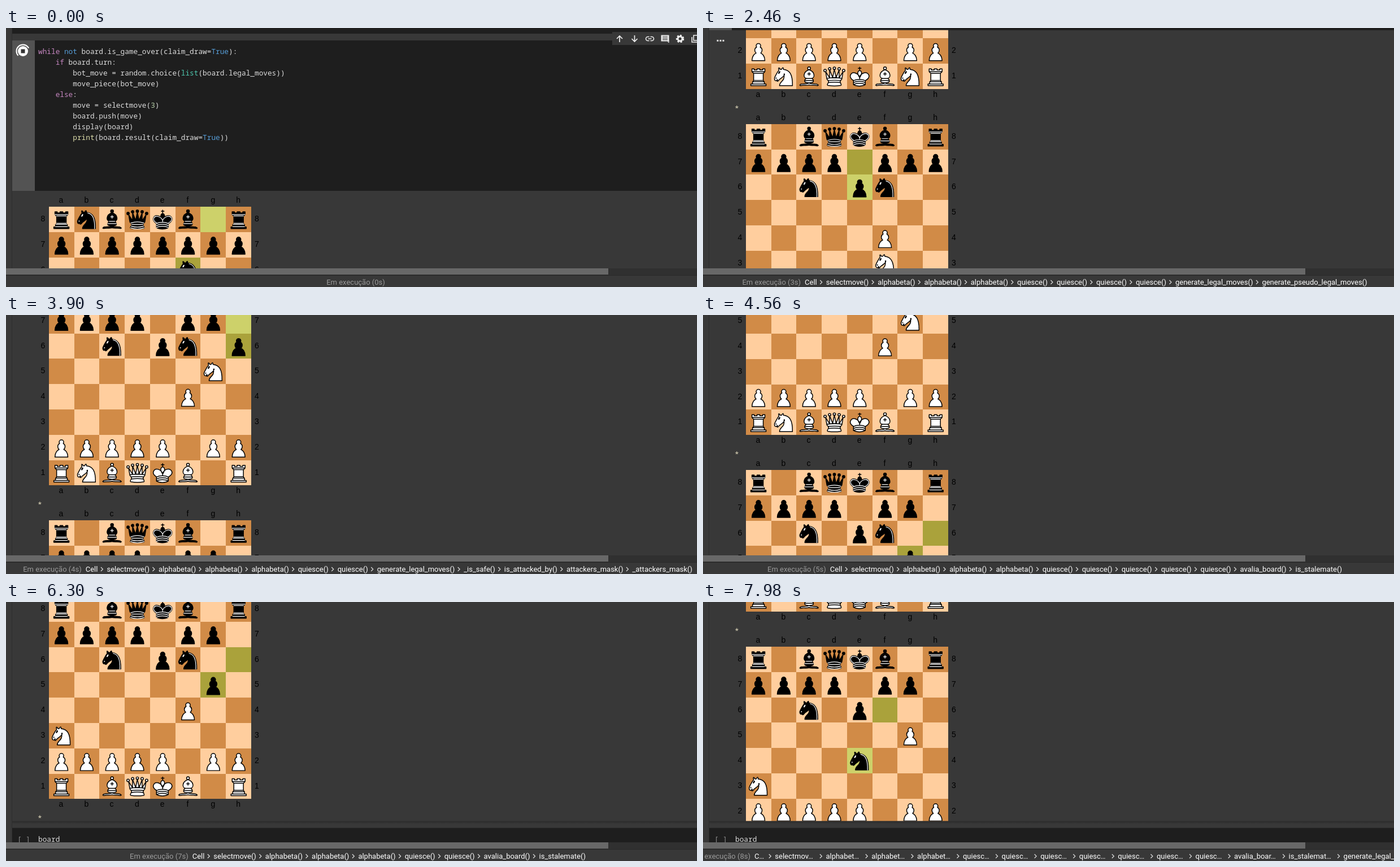
These frames come from a looping animation (1223 by 458 pixels, 8 s). An HTML page with a canvas:

```html
<!DOCTYPE html>
<html lang="pt">
<head>
<meta charset="utf-8">
<style>
html, body { margin: 0; width: 1223px; height: 458px; overflow: hidden; background: #383838; }
canvas { display: block; }
</style>
</head>
<body>
<canvas id="stage" width="1223" height="458"></canvas>
<script>
const ctx = document.getElementById('stage').getContext('2d');
const LOOP = 8000, STEP = 60, SQ = 44.8, PITCH = 420.2, OUT_H = 563.5;
const MONO = '12.77px "Noto Sans Mono", "DejaVu Sans Mono", monospace';
const UI = '13px Roboto, sans-serif';
const LABEL = '14px "Liberation Sans", Arial, sans-serif';

// ---- pieces, on a 45 unit square: body, lines for white, lines for black
const lowBand = 'M11.5 30c5.5-3 15.5-3 21 0M11.5 33.5c5.5-3 15.5-3 21 0M11.5 37c5.5-3 15.5-3 21 0';
const rookLines = 'M12 35.5h21M13 31.5h19M14 29.5h17M14 16.5h17M11 14h23';
const bishopLines = 'M17.5 26h10M15 30h15m-7.5-14.5v5M20 18h5';
const eyes = 'M9.4 25.5a.4.4 0 1 1-.8 0 .4.4 0 1 1 .8 0zM14.9 15.7a.5 1.5 30 1 1-.8-.5.5 1.5 30 1 1 .8.5z';
const dots = [[6, 12], [14, 9], [22.5, 8], [31, 9], [39, 12]]
  .map(([x, y]) => `M${x + 2.2} ${y}a2.2 2.2 0 1 1-4.4 0 2.2 2.2 0 1 1 4.4 0z`).join('');
const shapes = {
  p: ['M22.5 9c-2.21 0-4 1.79-4 4 0 .89.29 1.71.78 2.38C17.33 16.5 16 18.59 16 21c0 2.03.94 3.84 2.41 5.03-3 1.06-7.41 5.55-7.41 13.47h23c0-7.92-4.41-12.41-7.41-13.47 1.47-1.19 2.41-3 2.41-5.03 0-2.41-1.33-4.5-3.28-5.62.49-.67.78-1.49.78-2.38 0-2.21-1.79-4-4-4z', '', ''],
  n: ['M22 10c10.5 1 16.5 8 16 29H15c0-9 10-6.5 8-21M24 18c.38 2.91-5.55 7.37-8 9-3 2-2.82 4.34-5 4-1.04-.94 1.41-3.04 0-3-1 0 .19 1.23-1 2-1 0-4 1-4-4 0-2 6-12 6-12s1.89-1.9 2-3.5c-.73-1-.5-2-.5-3 1-1 3 2.5 3 2.5h2s.78-2 2.5-3c1 0 1 3 1 3',
    eyes, eyes + 'M24.4 11.2c7 1.2 12.8 8 12 28'],
  b: ['M9 36c3.39-.97 10.11.43 13.5-2 3.39 2.43 10.11 1.03 13.5 2 0 0 1.65.54 3 2-.68.97-1.65.99-3 .5-3.39-.97-10.11.46-13.5-1-3.39 1.46-10.11.03-13.5 1-1.35.49-2.32.47-3-.5 1.35-1.94 3-2 3-2zM15 32c2.5 2.5 12.5 2.5 15 0 .5-1.5 0-2 0-2 0-2.5-2.5-4-2.5-4 5.5-1.5 6-11.5-5-15.5-11 4-10.5 14-5 15.5 0 0-2.5 1.5-2.5 4 0 0-.5.5 0 2zM25 8a2.5 2.5 0 1 1-5 0 2.5 2.5 0 1 1 5 0z',
    bishopLines, bishopLines],
  r: ['M9 39h27v-3H9zM12 36v-4h21v4zM12.5 32l1.5-2.5h17l1.5 2.5zM14 29.5V17h17v12.5zM14 17l-3-3h23l-3 3zM11 14V9h4v2h5V9h5v2h5V9h4v5z', '', rookLines],
  q: [dots + 'M9 26c8.5-1.5 21-1.5 27 0l2-12-7 11V11l-5.5 13.5-3-15-3 15-5.5-14V25L7 14l2 12zM9 26c0 2 1.5 2 2.5 4 1 1.5 1 1 .5 3.5-1.5 1-1.5 2.5-1.5 2.5-1.5 1.5.5 2.5.5 2.5 6.5 1 16.5 1 23 0 0 0 1.5-1 0-2.5 0 0 .5-1.5-1-2.5-.5-2.5-.5-2 .5-3.5 1-2 2.5-2 2.5-4-8.5-1.5-18.5-1.5-27 0z',
    'M11.5 30c3.5-1 18.5-1 22 0M12 33.5c6-1 15-1 21 0',
    'M11 29a35 35 0 0 1 23 0M12.5 31.5h20M11.5 34.5a35 35 0 0 0 22 0M10.5 37.5a35 35 0 0 0 24 0'],
  k: ['M22.5 11.63V6M20 8h5M22.5 25s4.5-7.5 3-10.5c0 0-1-2.5-3-2.5s-3 2.5-3 2.5c-1.5 3 3 10.5 3 10.5M11.5 37c5.5 3.5 15.5 3.5 21 0v-7s9-4.5 6-10.5c-4-6.5-13.5-3.5-16 4V27v-3.5c-3.5-7.5-13-10.5-16-4-3 6 5 10 5 10V37z',
    lowBand, lowBand + 'M32 29.5s8.5-4 6-9.65C34.15 14 25 18 22.5 24.5v2.1-2.1C20 18 9.9 14 7 19.85c-2.5 5.65 4.85 9 4.85 9']
};
for (const key in shapes) shapes[key] = shapes[key].map(d => new Path2D(d));

// ---- the game: one board after each pair of moves
const square = s => [8 - s[1], s.charCodeAt(0) - 97];
const grid = ['rnbqkbnr', 'pppppppp', '', '', '', '', 'PPPPPPPP', 'RNBQKBNR']
  .map(row => [...row.padEnd(8)]);
const boards = ['f2f3 g8f6', 'f3f4 b8c6', 'g1f3 e7e6', 'f3g5 h7h6', 'b1a3 h6g5', 'f4g5 f6e4'].map(pair => {
  let marks;
  for (const move of pair.split(' ')) {
    const [r, c] = square(move), [r2, c2] = square(move.slice(2));
    grid[r2][c2] = grid[r][c];
    grid[r][c] = ' ';
    marks = [r * 8 + c, r2 * 8 + c2];
  }
  return { rows: grid.map(row => row.join('')), marks };
});

// ---- scrolling: start, end, distance
const pageMoves = [[850, 1080, 106], [1930, 2160, 100], [2290, 2520, 94], [2470, 2640, 76], [5590, 5820, 88]];
const outputMoves = [[1150, 1320, 282.2], [2290, 2455, 420.2], [2780, 2940, 420.2], [3070, 3300, 122.6],
  [3850, 4080, 101.6], [4570, 4800, 98], [4930, 5160, 98], [6490, 6720, -99], [6850, 7015, 518.2], [7750, 7980, -88]];
const ease = x => x * x * (3 - 2 * x);
const scrollAt = (moves, t) => moves.reduce((sum, [a, b, d]) =>
  sum + d * ease(Math.min(1, Math.max(0, (t - a) / (b - a)))), 0);

// ---- call stack shown in the status bar, one letter per function
const calls = {
  C: 'Cell', s: 'selectmove()', a: 'alphabeta()', q: 'quiesce()', g: 'generate_legal_moves()',
  p: 'generate_pseudo_legal_moves()', v: 'avalia_board()', t: 'is_stalemate()', f: '_is_safe()',
  i: 'is_attacked_by()', m: 'attackers_mask()', n: '_attackers_mask()', b: '_slider_blockers()', l: '__len__()'
};
const stacks = `0 |120 Csaaaqvtg|240 Csaaaqqvt|360 Csaaaqqqqvt|480 Csaaaqgp|600 Csaaaqqqvl|720 Csaaaqqqqvt|840 Csaaaqqvtg
|960 Csaaaqqqgp|1080 Csaaaqqvt|1200 Csaaagfi|1320 Csaaaqqqvtg|1440 Csaaaqqgf|1560 Csaaaqqqvt
|2340 Csaaaqqqqgp|2580 Csaaaqqqvtg|2820 Csaaaqqqqqqvtg|2940 Csaaaqqqqqqqvtg|3180 Csaaaqqgfimn
|3360 Csaaaqqqvt|3480 Csaaaqqqqqqvtg|3600 Csaaaqqvtgb|3720 Csaaaqqgfimn
|4320 Csaaaqqqqvt|4500 Csaaaqqqqqvt|5220 Csaaaqqqvt|5280 Csaaaqvtgb|6180 Csaaaqqvtg|6300 Csaaaqqvt
|6960 Csaaaqqvl|7080 Csaaaqqqqqqqvtg|7260 Csaaaqqqqqqqvtg`
  .split('|').map(entry => entry.split(' ')).map(([t, s]) => ({ t: +t, names: [...s.trim()].map(k => calls[k]) }));

const code = `while not board.is_game_over(claim_draw=True):
    if board.turn:
        bot_move = random.choice(list(board.legal_moves))
        move_piece(bot_move)
    else:
        move = selectmove(3)
        board.push(move)
        display(board)
        print(board.result(claim_draw=True))`.split('\n');
const tokenColor = {
  while: '#c586c0', if: '#c586c0', else: '#c586c0', not: '#569cd6', True: '#569cd6',
  list: '#4ec9b0', print: '#dcdcaa', 3: '#b5cea8'
};

function rect(x, y, w, h, color) {
  ctx.fillStyle = color;
  ctx.fillRect(x, y, w, h);
}
function text(s, x, y, color, font, align = 'left') {
  ctx.font = font;
  ctx.fillStyle = color;
  ctx.textAlign = align;
  ctx.fillText(s, x, y);
  return ctx.measureText(s).width;
}
function stroke(d, color, width, x = 0, y = 0) {
  ctx.save();
  ctx.translate(x, y);
  ctx.strokeStyle = color;
  ctx.lineWidth = width;
  ctx.stroke(new Path2D(d));
  ctx.restore();
}

function drawPiece(ch, x, y) {
  const kind = ch.toLowerCase(), black = ch === kind;
  const [body, whiteLines, blackLines] = shapes[kind];
  ctx.save();
  ctx.translate(x, y);
  ctx.scale(SQ / 45, SQ / 45);
  ctx.lineCap = ctx.lineJoin = 'round';
  ctx.lineWidth = 1.5;
  ctx.fillStyle = black ? '#000' : '#fff';
  ctx.strokeStyle = '#000';
  ctx.fill(body);
  ctx.stroke(body);
  if (black) {
    ctx.strokeStyle = '#fff';
    ctx.lineWidth = 1.2;
  }
  ctx.stroke(black ? blackLines : whiteLines);
  ctx.restore();
}

function drawBoard({ rows, marks }, top) {
  const bottom = top + 8 * SQ;
  for (let i = 0; i < 64; i++) {
    const r = i >> 3, c = i & 7, light = (r + c) % 2 === 0;
    const x = Math.round(75.7 + c * SQ), y = Math.round(top + r * SQ);
    const w = Math.round(75.7 + (c + 1) * SQ) - x, h = Math.round(top + (r + 1) * SQ) - y;
    const colors = marks.includes(i) ? ['#aaa23b', '#cdd16a'] : ['#d18b47', '#ffce9e'];
    rect(x, y, w, h, colors[+light]);
    if (rows[r][c] !== ' ') drawPiece(rows[r][c], 75.7 + c * SQ, top + r * SQ);
  }
  for (let i = 0; i < 8; i++) {
    const x = 97.5 + i * SQ, y = top + i * SQ + 26;
    text('abcdefgh'[i], x, top - 7, '#000', LABEL, 'center');
    text('abcdefgh'[i], x, bottom + 14, '#000', LABEL, 'center');
    text(8 - i, 65.5, y, '#000', LABEL, 'center');
    text(8 - i, 444, y, '#000', LABEL, 'center');
  }
  text('*', 56, bottom + 39, '#e6dfc0', MONO);
}

function drawSpinner(x, y, t) {
  ctx.beginPath();
  ctx.arc(x, y, 9, 0, 7);
  ctx.fillStyle = '#fff';
  ctx.fill();
  rect(x - 3.5, y - 3.5, 7, 7, '#333');
  const a = 2.4 + t / 1500 * 2 * Math.PI;
  ctx.beginPath();
  ctx.arc(x, y, 11.5, a, a + 3.4);
  ctx.strokeStyle = '#fff';
  ctx.lineWidth = 2;
  ctx.stroke();
}

function drawToolbar(y) {
  const white = '#eee';
  rect(1073, y - 12, 150, 23, '#383838');
  stroke('M0 6V-5M-5 0L0-5 5 0', white, 1.7, 1086, y);
  stroke('M0-6V5M-5 0L0 5 5 0', white, 1.7, 1112.5, y);
  stroke('M-1-3.5h-2.5a3.5 3.5 0 0 0 0 7H-1M1-3.5h2.5a3.5 3.5 0 0 1 0 7H1M-3 0h6', white, 1.6, 1139.5, y);
  rect(1159.5, y - 6.5, 14, 11, white);
  stroke('M11 3l3 4V3z', white, 1, 1159, y);
  stroke('M-4.5-4h9M-4.5-1.2h9M-4.5 1.6h9', '#383838', 1.2, 1166.5, y);
  ctx.setLineDash([3, 2.5]);
  stroke('M6 0a6 6 0 1 1-12 0 6 6 0 1 1 12 0z', white, 2.4, 1193, y);
  ctx.setLineDash([]);
  stroke('M4 0a4 4 0 1 1-8 0 4 4 0 1 1 8 0z', white, 3, 1193, y);
  stroke('M-4-3v9H8M-1-6h12v9H-1z', white, 1.6, 1218, y);
}

function drawCode(y, t) {
  rect(11, y - 30, 1212, 18, '#1f1f1f');
  rect(11, y, 1212, 266, '#1e1e1e');
  rect(11, y, 40, 266, '#535353');
  drawSpinner(30, y + 19, t);
  code.forEach((line, i) => {
    let x = 57;
    for (const part of line.split(/\b(while|if|else|not|True|list|print|3)\b/))
      x += text(part, x, y + 24 + i * 18.95, tokenColor[part] || '#dcdcdc', MONO);
  });
  drawToolbar(y - 3);
}

function drawNextCell(y) {
  const shade = ctx.createLinearGradient(0, y, 0, y + 5);
  shade.addColorStop(0, '#2b2b2b');
  shade.addColorStop(1, '#383838');
  rect(11, y, 1212, 5, shade);
  rect(11, y + 12, 1212, 80, '#1e1e1e');
  text('[ ]', 20, y + 36, '#8a8a8a', MONO);
  text('board', 57, y + 36, '#dcdcdc', MONO);
}

function drawStatus(t) {
  rect(0, 425, 1223, 12, '#303030');
  rect(0, 425, 1066, 11, '#686868');
  rect(0, 437, 1223, 21, '#383838');
  rect(0, 437, 1223, 1, '#2a2a2a');
  const stack = stacks.filter(s => s.t <= t).pop();
  const prefix = `Em execução (${Math.floor((stack.t + 740) / 1000)}s)`;
  ctx.font = UI;
  const width = s => ctx.measureText(s).width;
  const total = stack.names.reduce((sum, n) => sum + width(n) + 16, width(prefix) + 7 - (stack.names.length && 16));
  const tight = total > 1223;
  let x = tight ? 84 - width(prefix) : 622.5 - total / 2;
  x += text(prefix, x, 454, '#9a9a9a', UI) + 7;
  stack.names.forEach((name, i) => {
    if (i) stroke('M0-3.5L3.5 0 0 3.5', '#ddd', 1.2, x - 10.5, 449.5);
    const full = width(name);
    text(tight ? name.slice(0, -3) + '…' : name, x, 454, '#fff', UI);
    x += full + 16 - (tight ? 1.4 : 0);
  });
}

function draw(t) {
  const page = scrollAt(pageMoves, t), inner = scrollAt(outputMoves, t), out = 288 - page;
  rect(0, 0, 1223, 458, '#383838');
  rect(10, 0, 1, 425, '#2f2f2f');
  drawCode(22 - page, t);
  ctx.save();
  ctx.beginPath();
  ctx.rect(11, out, 1212, OUT_H);
  ctx.clip();
  boards.forEach((board, i) => {
    const top = out + 28 - inner + i * PITCH;
    if (top < 450 && top > -420) drawBoard(board, top);
  });
  ctx.restore();
  if (page > 110)
    for (let i = 0; i < 3; i++) rect(24.5 + i * 5, out + 17, 3, 3, '#ddd');
  drawNextCell(out + OUT_H);
  drawStatus(t);
}

const start = performance.now();
function frame() {
  const t = (performance.now() - start) % LOOP;
  draw(Math.floor(t / STEP) * STEP);
  requestAnimationFrame(frame);
}
frame();
</script>
</body>
</html>
```
